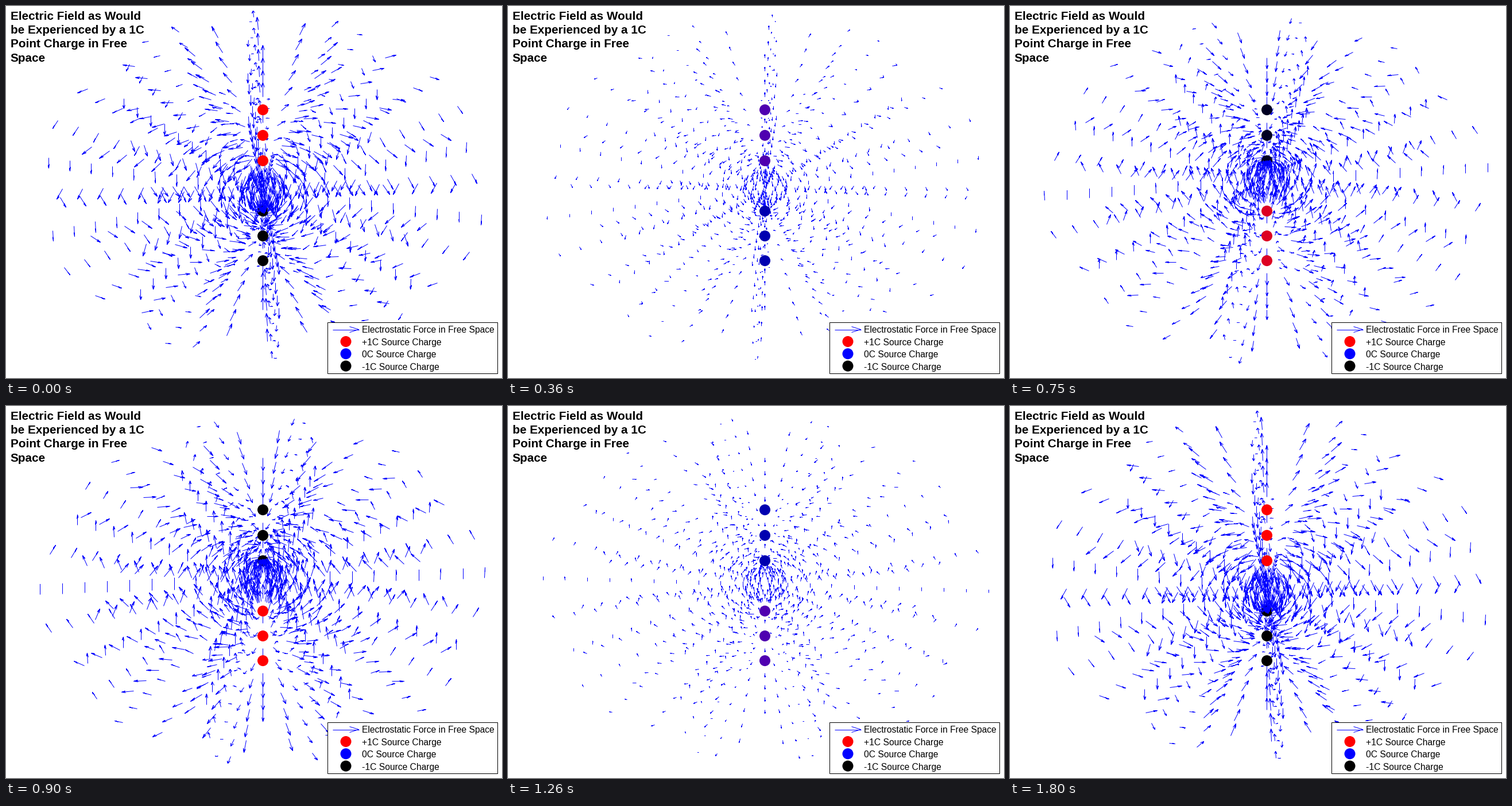
Recreate the animation shown at these times as a matplotlib script. Size 864 px wide and 648 px high, loop 1.83 s.

```python
import numpy as np
import matplotlib.pyplot as plt
from matplotlib.animation import FuncAnimation
from matplotlib.collections import LineCollection
from matplotlib.patches import Circle, Rectangle

W, H, DPI = 864, 648, 100
FRAMES, PERIOD = 61, 60
PX = 72 / DPI                       # one pixel in points
CX, CY = 447, 313
BLUE = (0, 0, 1)
CHARGES = np.array([-3, -2, -1, 1, 2, 3])

fig = plt.figure(figsize=(W / DPI, H / DPI), dpi=DPI, facecolor="white")
ax = fig.add_axes([0, 0, 1, 1])
ax.set_xlim(-0.5, W - 0.5)
ax.set_ylim(H - 0.5, -0.5)
ax.axis("off")


def project(right, back, z):
    """Mild perspective seen from above; returns screen pixels."""
    s = 1 / (1 + 0.005 * back - 0.0032 * z)
    return np.stack([CX + 48.56 * right * s,
                     CY - (25.6 * back + 43.8 * z) * s], axis=-1)


def sample_points():
    """Nested ellipsoid shells: size, radius, height and azimuth per arrow."""
    pts = []
    for r in np.arange(1, 11) / 10:
        for lat in np.radians(np.arange(-72, 73, 18)):
            for az in np.radians(np.arange(0, 360, 36)):
                pts.append((r, 8 * r * np.cos(lat), 5 * r * np.sin(lat), az))
        for z in (-5 * r, 5 * r):
            if np.abs(CHARGES - z).min() > 1e-6:
                pts.append((r, 0, z, np.radians(72)))
    return np.array(pts).T


def field(rho, z):
    e_rho, e_z = np.zeros_like(rho), np.zeros_like(z)
    for c in CHARGES:
        d3 = np.hypot(rho, z - c) ** 3
        e_rho += np.sign(c) * rho / d3
        e_z += np.sign(c) * (z - c) / d3
    return e_rho, e_z


shell, rho, height, azimuth = sample_points()
e_rho, e_z = field(rho, height)
mag = np.hypot(e_rho, e_z)
length = 0.518 * mag ** 0.06        # strongly compressed magnitudes
u, w = e_rho / mag * length, e_z / mag * length
inner = shell < 0.15


def arrows(angle, q):
    """Polyline (tail, tip, barb, tip, barb) for every arrow, on whole pixels."""
    a = azimuth + angle
    c, s = np.cos(a), np.sin(a)

    def at(along, side):
        p = rho + q * along * u
        t = side * q * length
        return project(p * c - t * s, p * s + t * c, height + q * along * w)

    tip = at(1, 0)
    return np.round(np.stack(
        [at(0, 0), tip, at(0.67, 0.11), tip, at(0.67, -0.11)], axis=1))


def charge_color(q):
    return (max(q, 0), 0, 1 - abs(q))


def dot(x, y, color, z):
    return ax.add_patch(Circle((x, y), 9.5, fc=color, ec="none", zorder=z))


def strokes(segments, z):
    return ax.add_collection(LineCollection(
        segments, colors=[BLUE], linewidths=PX, zorder=z))


def label(x, y, text, px, weight="normal"):
    ax.text(x, y, text, fontsize=px * PX, family="Liberation Sans",
            weight=weight, color="black", va="baseline", zorder=12)


# Only the innermost shell passes in front of the charges.
outer_arrows, inner_arrows = strokes([], 1), strokes([], 3)
balls = [dot(*project(0, 0, c), "k", 2) for c in CHARGES]

for k, line in enumerate(["Electric Field as Would", "be Experienced by a 1C",
                          "Point Charge in Free", "Space"]):
    label(7, 23 + 24.4 * k, line, 20.8, "bold")

ax.add_patch(Rectangle((559, 550), 296, 89, fc="white", ec="black", lw=PX,
                       zorder=10))
strokes([[(568, 563), (614, 563)], [(598, 558), (614, 563), (598, 568)]], 11)
label(619, 569, "Electrostatic Force in Free Space", 15.6)
for k, (name, q) in enumerate([("+1C", 1), ("0C", 0), ("-1C", -1)]):
    dot(591.5, 584 + 21.3 * k, charge_color(q), 11)
    label(619, 590.5 + 21.3 * k, name + " Source Charge", 15.6)


def update(i):
    q = np.cos(2 * np.pi * i / PERIOD)
    lines = arrows(np.radians(22 - 0.6 * i), q)
    outer_arrows.set_segments(lines[~inner])
    inner_arrows.set_segments(lines[inner])
    for ball, c in zip(balls, CHARGES):
        ball.set_facecolor(charge_color(q * np.sign(c)))
    return [outer_arrows, inner_arrows, *balls]


anim = FuncAnimation(fig, update, frames=FRAMES, interval=30, repeat=True,
                     repeat_delay=0, blit=False)
plt.show()
```
